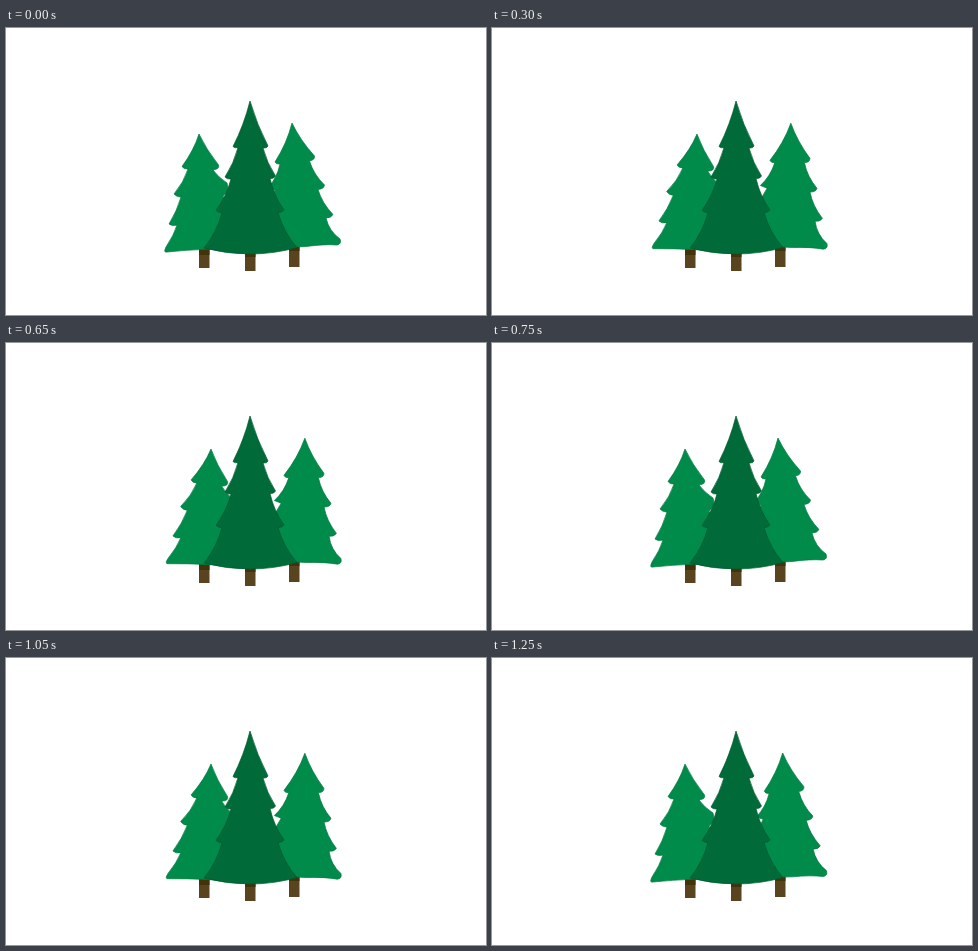
An HTML page that plays this animation: 480x287 px, repeating every 1350 ms.

```html
<!DOCTYPE html>
<html lang="en">
<head>
<meta charset="utf-8">
<title>Swaying trees</title>
<style>
html, body { margin: 0; width: 100%; height: 100%; overflow: hidden; background: #fff; }
svg { display: block; width: 100vw; height: 100vh; }
.side { fill: #008b4a; stroke: #007a40; stroke-width: .7; }
.front { fill: #006a38; stroke: #005a2f; stroke-width: .7; }
.trunk { fill: #5a431f; }
.shade { fill: #43320a; }
</style>
</head>
<body>
<svg viewBox="0 0 480 287">
  <g class="trunk">
    <rect x="193" y="221" width="10.5" height="19"/>
    <rect x="283" y="218" width="10.5" height="21"/>
    <rect x="239" y="222" width="10.5" height="21"/>
  </g>
  <g class="shade">
    <rect x="193" y="221" width="10.5" height="6"/>
    <rect x="283" y="218" width="10.5" height="5"/>
    <rect x="239" y="222" width="10.5" height="7"/>
  </g>
  <path id="left" class="side" d="M193 106Q200 121 212.500 137Q214 141 207 142Q212 149 221 155Q224 163 217 168Q222 182 233 194L226 198Q232 212 242 221Q200 220 161 224Q157 225 160 219Q168 207 171 197Q166 198.500 163 196Q171 183 175 169Q171 169.500 168 166Q178 154 182 141Q178 141.500 176 138.500Q188 122 193 106Z"/>
  <path id="right" class="side" d="M286 95Q294 112 308.500 128Q309 132 303.500 133Q308 147 318.500 157Q318 161 312 161.500Q316 175 327 186.500Q325 190 320 190Q323 203 334 211Q336 216 331 217Q318 216 300 218.500Q270 220 246 221Q258 205 263 190L256 188Q264 174 269 162L262 160Q271 150 274 136Q270 136.500 269 134Q281 115 286 95Z"/>
  <path class="front" d="M244 73Q251 97 262 118Q261 120.500 257 120Q261 135 269.500 148Q268 151 264 150.500Q268 168 278 182Q276 184.500 272 184.500Q278 205 291 219.500Q268 226 244 226Q220 226 198 220Q211 204 216 184.500Q212 184.500 210 182.500Q221 167 225 151Q221 151.500 219 149Q228 135 232 119.500Q229 120.500 227 118.500Q238 97 244 73Z"/>
</svg>
<script>
const LOOP = 1350;
// [start ms, left lean, right lean] in degrees
const POSES = [
  [0, 0, 0], [200, 2.6, 2.9], [300, 5.2, 5.8], [400, 2.6, 4],
  [500, 0, 2.1], [600, 2.6, 4], [650, 5.2, 5.8], [700, 2.6, 2.9],
  [750, 0, 0], [950, 2.6, 2.9], [1050, 5.2, 5.8], [1150, 2.6, 4],
  [1250, 0, 2.1]
];
const left = document.getElementById("left");
const right = document.getElementById("right");

function lean(tree, angle, x, y) {
  tree.setAttribute("transform", `rotate(${angle} ${x} ${y})`);
}

function draw(time) {
  const t = time % LOOP;
  const [, l, r] = POSES.filter(p => p[0] <= t).pop();
  lean(left, l, 198, 238);
  lean(right, r, 290, 222);
}

const start = performance.now();
function tick() {
  draw(performance.now() - start);
  requestAnimationFrame(tick);
}
tick();
</script>
</body>
</html>
```
